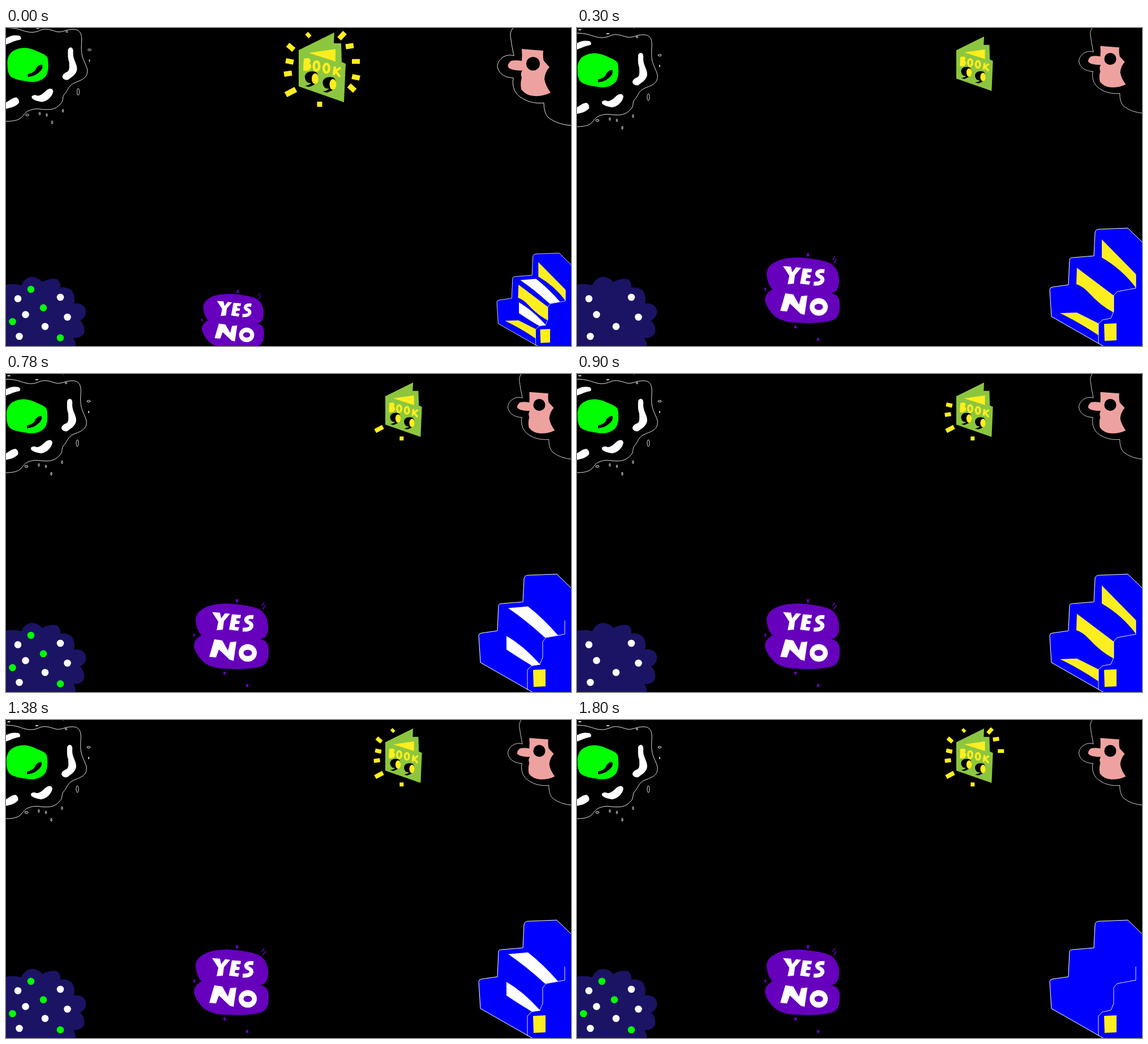
An HTML page that plays this animation: 998x561 px, repeating every 2100 ms.

```html
<!DOCTYPE html>
<html lang="en">
<head>
<meta charset="utf-8">
<title>Stickers</title>
<style>
html, body { margin: 0; width: 100%; height: 100%; overflow: hidden; background: #000; }
svg { display: block; width: 100vw; height: 100vh; }
.line { fill: none; stroke: #fff; stroke-width: .9; }
.white { fill: #fff; }
.green { fill: #0f0; }
.yellow { fill: #ffee1f; }
.purple { fill: #6600bd; }
.navy { fill: #1b1464; }
.pink { fill: #eea2a0; }
.lime { fill: #8cc63f; }
.blue { fill: #00f; }
.letter { fill: none; stroke: #ffee1f; stroke-width: 4.4; }
</style>
</head>
<body>
<svg viewBox="0 0 998 561">
  <g id="egg">
    <path class="line" d="M-3 9Q12 9 22 12C34 16 44 20 58 14C68 9 78 13 88 16C98 18 104 12 116 12C132 11 133 24 132 36C130 62 137 66 142 82C144 98 132 101 120 106C108 111 108 120 102 126C97 131 101 138 95 143C86 154 76 154 62 153C50 151 44 153 37 156C30 160 28 168 20 171C12 174 6 174 -3 174"/>
    <g id="drops" class="line"></g>
    <path class="white" d="M-2 28C8 22 14 22 22 23Q27 26 24 30Q14 32 8 35Q2 37 -2 39Z
      M108 48Q110 43 114 44Q118 46 117 54C117 66 124 72 124 82C123 92 114 96 108 101Q100 102 98 96Q98 91 104 88C112 86 110 78 110 70C107 62 108 54 108 48Z
      M44 130Q48 126 54 129C62 129 66 122 72 118Q80 114 82 121C80 132 70 139 62 140Q48 138 44 133Z
      M-2 141C6 137 10 132 17 132Q23 136 21 142C16 148 8 150 -2 152Z"/>
    <path class="green" d="M1 73C0 62 5 52 15 48C28 43 36 44 48 48C58 53 68 55 72 62C74 74 74 86 69 94C62 103 50 106 38 104C25 102 10 100 5 93C1 86 1 80 1 73Z"/>
    <path d="M37 91Q50 88 52 80Q56 74 62 74Q64 76 62 82Q54 94 37 96Z"/>
  </g>

  <g id="book">
    <path class="lime" d="M517 39L580 8L579 27H592L593 60L600 63L597 131L517 103Z"/>
    <path class="yellow" d="M535 44L582 37V59Z"/>
    <path class="yellow" d="M526 54L534 53Q541 56 536 62Q542 66 537 73Q533 77 525 75Z"/>
    <g class="letter">
      <ellipse cx="548.5" cy="67" rx="4.8" ry="7.8"/>
      <ellipse cx="566" cy="71" rx="4.8" ry="7.6"/>
      <path d="M581 68L579 83M591 70L582 76L590 86"/>
    </g>
    <g id="eye">
      <path d="M528 88C527 78 538 74 548 78Q553 84 551 94Q546 101 535 104L528 102Q536 101 539 97Q530 98 528 88Z"/>
      <ellipse class="yellow" cx="546" cy="89.5" rx="6" ry="9.5"/>
    </g>
    <use href="#eye" x="31.5" y="10"/>
    <g id="rays" class="yellow"></g>
  </g>

  <g id="face">
    <path class="line" d="M897 -2Q890 6 891 14Q893 30 897 49C882 44 868 56 868 68C870 82 884 88 896 88Q893 104 902 116C915 130 935 134 950 132Q950 150 958 158Q975 171 1000 172"/>
    <path class="pink" d="M911 37L949 40Q948 52 950 58L960 69Q952 78 951 90Q953 102 962 114Q948 121 933 120Q918 119 910 108Q908 96 911 88Q908 80 912 75Q892 75 887 69Q885 64 892 58Q900 56 911 58Q912 48 911 37Z"/>
    <circle cx="931" cy="63" r="12"/>
  </g>

  <g id="cloud">
    <path class="navy" d="M-2 453Q16 450 27 454Q33 440 46 439Q58 440 64 448Q78 441 90 443Q97 448 96 458Q108 456 117 464Q123 475 120 486Q134 484 140 494Q145 508 131 516Q140 525 138 538Q133 548 119 547Q124 554 123 563H-2Z"/>
    <g id="whiteDots" class="white"></g>
    <g id="greenDots" class="green"></g>
  </g>

  <g id="answer">
    <path class="purple" d="M345 416C358 407 372 405 395 405C415 407 435 409 447 415C458 421 463 433 463 446C463 460 458 466 449 468C460 470 464 476 464 488C464 505 460 513 450 516C430 521 410 521 395 520C375 520 360 517 350 509C340 500 333 488 332 480C332 470 338 466 345 461C337 452 335 440 335 431Q337 421 345 416Z"/>
    <path class="purple" d="M406 397h4v6h-4zM331 458h3v5h-3zM384 525h4v5h-4zM424 547h4v5h-4z"/>
    <path fill="none" stroke="#6600bd" stroke-width="1.6" d="M451.500 409L456 403M453.500 415L458 408"/>
    <path class="white" d="M364 420L378 421L380 431L387 422L396 423L385 436L383 451L372 452L375 437Z
      M399 424L415 425L414 431L407 431V435L413 436L412 441L405 441L404 446L412 447L410 453L394 451Z
      M368 468L382 470L392 488L396 473L407 472L402 506L395 504L376 486L371 500L359 499Z"/>
    <path fill="none" stroke="#fff" stroke-width="7" d="M437 429C424 427 421 435 428 438C437 441 436 452 418 451"/>
    <ellipse class="white" cx="427" cy="492" rx="16" ry="15.500"/>
    <ellipse class="purple" cx="427" cy="492" rx="7.500" ry="5.500"/>
  </g>

  <g id="stairs">
    <path class="blue" stroke="#fff" stroke-width="1" d="M835 461Q836 457 840 457L868 453L870 409Q870 405 876 405L913 402L915 361Q916 355 922 355L973 353L1010 389V566H938L838 509Z"/>
    <path id="yellowSteps" class="yellow" d="M927 373L987 434V458Q962 425 927 405Z
      M883 423L948 472V502Q925 490 905 468Q893 455 882 452Z
      M853 503L883 502L921 521V542Q885 518 853 503Z"/>
    <path id="whiteSteps" class="white" d="M887 413L922 410Q950 432 975 461L952 465Q918 434 887 413Z
      M884 462Q915 480 944 513L928 514Q900 497 884 486Z"/>
    <path class="line" d="M987 435V459L954 465L948 472V500L943 512L928 515L921 522V557"/>
    <path class="yellow" d="M931 522L953 521V551L932 552Z"/>
  </g>
</svg>
<script>
const $ = id => document.getElementById(id);
const fill = (id, items, draw) => { $(id).innerHTML = items.map(draw).join(''); };
const show = (id, on) => { $(id).style.display = on ? '' : 'none'; };
const dot = ([x, y]) => `<circle cx="${x}" cy="${y}" r="6.3"/>`;

// x, y, rx, ry
fill('drops', [
  [146, 48, 3, 1.5], [146, 67, .4, 2], [126, 122, 2, 6], [99, 155.5, 1.1, 2.8],
  [80, 176, 1.1, 2.8], [70.5, 163, 1, 2.6], [58, 160.5, 1.2, 2.5], [36, 163, 3, 1.7],
  [106, 16, 1.5, 1.4], [54.5, 10, 2.5, .6], [5, 3, 2.5, .7], [101, -1, 1.5, 1]
], ([x, y, rx, ry]) => `<ellipse cx="${x}" cy="${y}" rx="${rx}" ry="${ry}"/>`);

// x, y, width, height, angle, in order of appearance
fill('rays', [
  [503, 113, 20, 10, -28], [554, 134.5, 9, 9, 0], [498, 80.5, 14, 9, -8],
  [501, 59, 14, 9, 12], [503, 34, 14, 9, 40], [534, 12.5, 9, 7, 45],
  [593.5, 13.5, 15, 9, -48], [607, 32, 14, 9, -8], [618, 59, 14, 8.5, 0],
  [618, 87, 14, 9, 12], [611, 106, 14, 9.5, 42]
], ([x, y, w, h, a]) =>
  `<rect x="${-w / 2}" y="${-h / 2}" width="${w}" height="${h}" transform="translate(${x} ${y}) rotate(${a})"/>`);

fill('whiteDots', [[21, 477.5], [96, 475], [34.5, 505.5], [108.5, 510], [69, 526.5], [23.5, 544]], dot);
fill('greenDots', [[44, 461], [66, 493.5], [11.5, 518], [96, 546.5]], dot);

// x, y, scale: the opening pose, then the pose held for the rest of the loop
const rest = [0, 0, 1];
const poses = {
  egg: [[1.5, -9.5, 1], rest],
  book: [rest, [266.7, 8.8, .78]],
  face: [rest, [122.7, -.9, .88]],
  answer: [[69.4, 131.6, .833], rest],
  stairs: [[201.5, 115.7, .797], rest]
};

function frame(now) {
  const step = Math.floor(now % 2100 / 300);
  for (const id in poses) {
    const [x, y, s] = poses[id][step ? 1 : 0];
    $(id).setAttribute('transform', `translate(${x} ${y}) scale(${s})`);
  }
  const lit = step ? Math.min(2 * (step - 1), 9) : 11;
  [...$('rays').children].forEach((ray, i) => { ray.style.display = i < lit ? '' : 'none'; });
  show('greenDots', step % 2 === 0);
  show('yellowSteps', step === 0 || step % 2 === 1);
  show('whiteSteps', step % 2 === 0 && step < 6);
}

const start = performance.now();
function tick() {
  frame(performance.now() - start);
  requestAnimationFrame(tick);
}
tick();
</script>
</body>
</html>
```
